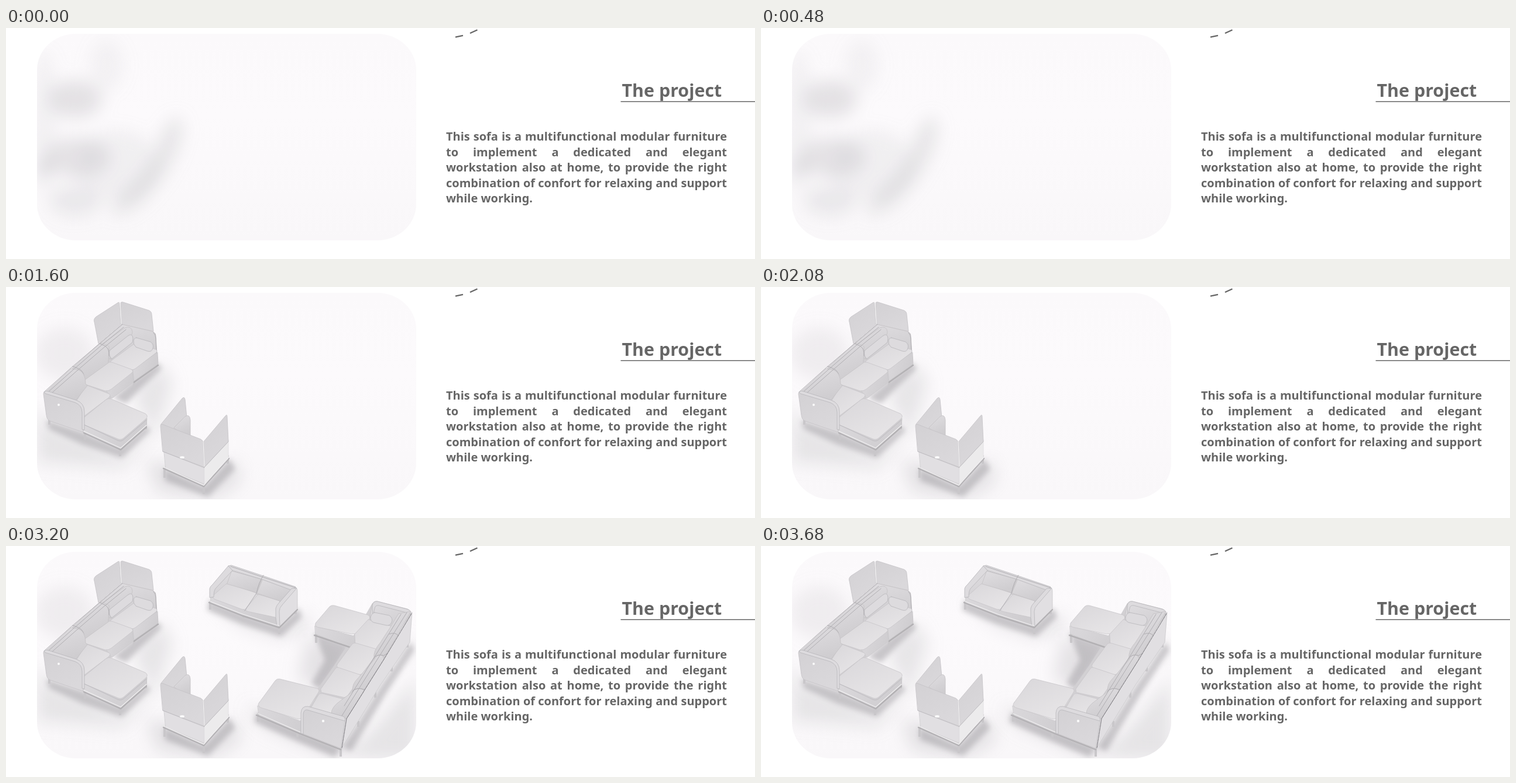
An HTML page that plays this animation: 1280x396 px, repeating every 4 s.

```html
<!DOCTYPE html>
<html lang="en">
<head>
<meta charset="utf-8">
<title>The project</title>
<style>
html, body { margin: 0; width: 100%; height: 100%; overflow: hidden; background: #fff; }
svg { position: absolute; left: 0; top: 0; }
text, .copy { font-family: "Noto Sans", "Open Sans", sans-serif; font-weight: 700; color: #666; fill: #666; }
.copy { position: absolute; left: 752px; top: 173px; width: 480px; font-size: 20px; line-height: 26.6px; }
.copy div { white-space: nowrap; text-align-last: justify; }
.copy div:last-child { text-align-last: left; }
.step path { stroke-linejoin: round; stroke-linecap: round; stroke-width: .8; }
.step .body { fill: #d2d0d3; }
.step .seat { fill: url(#seat); stroke: #c8c6c9; }
.step .front { fill: url(#front); stroke: #cbc9cc; }
.step .back { fill: url(#back); stroke: #c4c2c5; }
.step .wall { fill: url(#wall); stroke: #c4c2c6; }
.step .pale { fill: #ecebec; stroke: #e0dee1; }
.step .side { fill: #e1dfe2; stroke: #cbc9cc; }
.step .roll { fill: #dddbde; stroke: #b8b6ba; }
.step .seam { fill: none; stroke: #b0aeb2; stroke-width: 1; }
.step .hem { fill: none; stroke: #77757a; stroke-width: 1; stroke-dasharray: 5 1; }
.step .base { fill: none; stroke: #b3b1b4; stroke-width: 2.4; }
.step .leg { fill: none; stroke: #c9c7ca; stroke-width: 4; stroke-linecap: butt; }
.step .shine { fill: none; stroke: #f0eff0; stroke-width: 1.2; }
.step circle { fill: #fafafa; }
.soft { filter: url(#blur); fill: #c3c1c5; }
.near { filter: url(#haze); fill: #a8a6aa; opacity: .6; }
</style>
</head>
<body>
<svg width="1280" height="396" viewBox="0 0 1280 396">
  <defs>
    <filter id="blur" x="-80%" y="-80%" width="260%" height="260%"><feGaussianBlur stdDeviation="14"/></filter>
    <filter id="haze" x="-50%" y="-50%" width="200%" height="200%"><feGaussianBlur stdDeviation="5"/></filter>
    <clipPath id="card"><rect x="53" y="10" width="648" height="354" rx="66" ry="62"/></clipPath>
    <linearGradient id="paper" x2="0" y2="1"><stop stop-color="#fbf9fb"/><stop offset=".4" stop-color="#fcfafc"/><stop offset="1" stop-color="#f9f7f9"/></linearGradient>
    <linearGradient id="seat" x2=".7" y2="1"><stop stop-color="#d9d7da"/><stop offset="1" stop-color="#e7e5e7"/></linearGradient>
    <linearGradient id="front" x2="1" y2=".3"><stop stop-color="#dbd9dc"/><stop offset="1" stop-color="#cfcdd0"/></linearGradient>
    <linearGradient id="back" x2=".4" y2="1"><stop stop-color="#e0dee1"/><stop offset="1" stop-color="#cfcdd0"/></linearGradient>
    <linearGradient id="wall" x2=".5" y2="1"><stop stop-color="#d3d1d4"/><stop offset="1" stop-color="#dad8db"/></linearGradient>
  </defs>

  <g clip-path="url(#card)">
    <path fill="url(#paper)" d="M53 10H701V364H53Z"/>

    <g class="step soft" data-from="0" data-to="0">
      <ellipse cx="118" cy="122" rx="46" ry="32" opacity=".42"/>
      <ellipse cx="65" cy="160" rx="22" ry="120" opacity=".16"/>
      <ellipse cx="122" cy="222" rx="56" ry="34" opacity=".38"/>
      <ellipse cx="66" cy="240" rx="12" ry="16" opacity=".4"/>
      <ellipse cx="118" cy="296" rx="44" ry="26" opacity=".28"/>
      <ellipse cx="172" cy="64" rx="28" ry="44" opacity=".15"/>
      <path d="M292 150C315 165 292 225 262 264S205 325 178 316Q190 290 220 262T270 172Z" opacity=".36"/>
      <ellipse cx="190" cy="235" rx="70" ry="60" opacity=".18"/>
    </g>

    <g class="step" data-from="1">
      <g class="soft">
        <ellipse cx="100" cy="115" rx="50" ry="45" opacity=".22"/>
        <path d="M53 200 75 235 195 290 245 240 215 180 265 130 285 165 262 235 200 310 53 300Z" opacity=".36"/>
      </g>
      <path class="near" d="M68 228 132 248 196 276 240 238 247 246 198 293 130 270 74 244ZM182 190 218 160 260 130 266 140 226 178 205 200Z"/>
      <path class="leg" d="M74 227V236M135 250V262M195 278V290M239 229V244M219 162V175M258 120V136"/>
      <path class="body" d="M66 182 160 97 200 66 256 80 258 130 218 160 181 190 132 232Z"/>
      <path class="wall" d="M158 97 151 60Q149 55 154 51L191 27Q194 25 194 29L196 64Z"/>
      <path class="wall" d="M196 28Q196 25 200 26L244 40Q249 42 249 47L252 76 197 64Z"/>
      <path class="shine" d="M195 27 197 63"/>
      <path class="back" d="M160 97 198 64 250 76Q256 78 256 85L258 115 220 104 182 126Z"/>
      <path class="seam" d="M252 78Q256 82 256 88L258 132"/>
      <path class="front" d="M217 142 259 112 260 132 219 161Z"/>
      <path class="seat" d="M179 127 217 99Q222 96 227 98L256 107Q260 110 256 113L221 140Q217 143 212 141L180 131Z"/>
      <path class="back" d="M163 99 203 70Q215 66 216 77L215 82 180 111 178 124 162 110Z"/>
      <path class="roll" d="M177 109 208 84Q216 78 217 88L216 95 181 123Q175 119 177 109Z"/>
      <path class="roll" d="M223 87 247 94Q253 98 251 105 249 112 242 110L222 103Q217 98 218 92 219 87 223 87Z"/>
      <path class="front" d="M172 178 216 146 218 163 181 191Z"/>
      <path class="seat" d="M132 160 171 131Q176 128 181 129L214 141Q219 144 214 148L180 175Q175 179 169 178L133 166Z"/>
      <path class="back" d="M114 138 157 99Q163 95 168 98L176 102 175 130 135 159 122 149Z"/>
      <path class="seam" d="M114 136 124 140Q134 145 134 157M160 97 169 101Q177 105 176 118"/>
      <path class="seat" d="M120 196 137 168 176 183Q180 186 175 190L134 221Z"/>
      <path class="back" d="M66 181 111 140 124 142Q136 147 136 166L139 169 118 196Z"/>
      <path class="seam" d="M65 180 113 137 160 97 199 64M72 180 117 140 163 100 201 69M79 181 122 143 167 104 205 73"/>
      <path class="front" d="M130 231 196 262 241 225 240 239 196 277 132 246Z"/>
      <path class="seat" d="M133 224 171 193Q175 190 180 192L238 217Q244 221 239 226L201 259Q196 263 190 260L133 236Q127 230 133 224Z"/>
      <path class="seam" d="M131 235 191 263Q197 266 203 260L240 228" opacity=".6"/>
      <path class="base" d="M133 250 196 279 240 240M219 163 260 134"/>
      <path class="shine" d="M133 247 196 276 240 237"/>
      <path class="wall" d="M64 183Q64 179 69 180L115 195Q131 200 131 214L132 249 76 230Q70 228 69 220Z"/>
      <path class="roll" d="M65 180Q68 177 73 179L120 194Q134 199 134 214V245L130 244V215Q130 203 118 198L68 183Z"/>
      <circle cx="90" cy="202" r="2"/>
    </g>

    <g class="step" data-from="2">
      <path class="soft" opacity=".42" d="M240 300 270 300 340 345 395 295 400 335 350 364 260 350Z"/>
      <path class="near" d="M270 311 338 342 382 294 392 312 345 360 272 332Z"/>
      <path class="leg" d="M271 310V327M338 340V355M379 289V303"/>
      <path class="wall" d="M265 235 301 191Q305 187 306 193L309 224 302 254 268 248Z"/>
      <path class="back" d="M287 241 306 222Q314 217 315 228L315 256 303 254Z"/>
      <path class="base" d="M269 311 338 342 381 294"/>
      <path class="side" d="M270 280 339 307 339 338 273 311Z"/>
      <path class="pale" d="M339 307 380 262 380 294 339 338Z"/>
      <path class="wall" d="M264 238Q264 234 269 236L333 261Q337 263 337 268L339 310 268 282Z"/>
      <path class="wall" d="M337 266 375 221Q378 217 378 223L380 265 339 309Z"/>
      <path class="shine" d="M337 265 339 308"/>
      <path class="seam" d="M268 282 339 309 380 265" opacity=".45"/>
      <path class="shine" d="M270 309 338 340 381 291"/>
      <ellipse cx="301" cy="292" rx="4" ry="2" fill="#fafafa"/>
    </g>

    <g class="step soft" data-from="3" data-to="3">
      <path d="M470 125 530 110 535 160 480 155Z" opacity=".45"/>
      <ellipse cx="322" cy="73" rx="28" ry="22" opacity=".15"/>
    </g>

    <g class="step" data-from="3">
      <g class="soft">
        <path d="M600 180 690 160 705 220 640 300 580 364H701V180Z" opacity=".36"/>
        <path d="M410 275 440 310 510 340 570 364 600 330 430 280Z" opacity=".4"/>
        <path d="M515 155 590 180 560 215 530 245 500 225Z" opacity=".4"/>
      </g>
      <path class="near" d="M526 148 590 170 568 204 538 248 522 235 545 195ZM428 285 503 318 572 346 562 362 500 336 424 302ZM692 165 640 240 575 345 590 352 650 252 698 178Z"/>
      <path class="leg" d="M530 151V166M588 172V185M431 286V301M498 316V328M572 344V361M602 300V310M631 248V260M659 206V215M686 164V174"/>
      <path class="body" d="M596 150 626 98 690 112 580 298 506 282 560 206Z"/>
      <path class="side" d="M694 114 690 165 640 238 572 349 580 295Z"/>
      <path class="front" d="M528 137 594 154 620 140 598 172 588 174 529 151Z"/>
      <path class="seat" d="M530 131 553 104Q556 101 561 102L618 118Q623 120 621 125L601 147Q597 152 591 151L532 139Q526 136 530 131Z"/>
      <path class="base" d="M527 153 589 174"/>
      <path class="back" d="M622 120 626 100Q628 94 635 95L686 108Q694 111 690 119L666 155 630 140Z"/>
      <path class="roll" d="M626 102Q627 94 635 95L685 108Q694 111 692 117L684 114 637 102Q631 101 630 107L627 120Z"/>
      <path class="seat" d="M596 151 619 126 660 138 641 175Q637 180 631 178L597 167Z"/>
      <path class="roll" d="M630 114 655 119Q662 124 659 131 656 137 650 136L628 131Q622 128 623 122 625 115 630 114Z"/>
      <path class="seat" d="M566 203 591 169Q594 165 600 167L634 177Q638 179 635 183L611 216Q607 222 601 220L569 210Q564 207 566 203Z"/>
      <path class="seat" d="M538 245 563 210Q565 207 570 209L603 220Q609 222 605 226L585 255Q581 261 575 259L539 251Z"/>
      <path class="seat" d="M509 283 534 255Q536 252 541 253L575 262 566 292Z"/>
      <path class="back" d="M671 116 692 112 662 165 643 197 629 193Q627 180 640 165L655 142Z"/>
      <path class="back" d="M629 195Q633 186 643 186L646 194 608 253 593 248Q590 238 602 226Z"/>
      <path class="back" d="M592 250Q598 242 610 246L612 249 582 296 556 287Q556 276 572 265Z"/>
      <path class="seam" d="M675 117 578 274M685 114 574 291M627 194Q633 184 645 188L652 184M592 249Q600 241 612 246M655 151Q664 147 670 153"/>
      <path class="hem" d="M693 116 646 194 582 296 574 346"/>
      <path class="front" d="M430 274 503 300 534 255 506 304 503 322 432 288Z"/>
      <path class="seat" d="M433 268 460 231Q463 227 468 228L531 244Q537 246 534 251L508 292Q504 298 497 296L435 277Q428 273 433 268Z"/>
      <path class="base" d="M428 290 503 322 572 349"/>
      <path class="shine" d="M430 287 503 319"/>
      <path class="wall" d="M506 284Q507 275 515 277L575 294Q580 296 579 301L572 347 505 321Z"/>
      <path class="roll" d="M504 321V286Q505 274 516 275L576 292Q581 294 579 300L515 281Q509 280 508 288V322Z"/>
      <circle cx="542" cy="300" r="2.2"/>
    </g>

    <g class="step" data-from="4">
      <path class="soft" opacity=".4" d="M340 90 405 125 465 145 515 115 520 140 470 160 400 138Z"/>
      <path class="near" d="M348 92 405 116 467 137 500 106 506 122 470 156 402 134 344 110Z"/>
      <path class="leg" d="M349 95V109M405 118V129M467 137V151M495 104V117"/>
      <path class="front" d="M350 85 407 109 466 122 467 138 405 118 350 99Z"/>
      <path class="back" d="M350 70 380 35 437 53 495 72 466 104 430 84 378 64 352 88Z"/>
      <path class="seat" d="M355 84 375 66Q378 63 383 65L426 80Q430 82 427 86L411 106Q408 110 402 108L356 91Q351 88 355 84Z"/>
      <path class="seat" d="M411 106 428 86Q430 82 435 84L468 94 464 123 412 112Q408 110 411 106Z"/>
      <path class="back" d="M386 43 437 57 428 80 378 65Z"/>
      <path class="back" d="M439 57 489 74 470 95 429 81Z"/>
      <path class="roll" d="M380 34 385 33 439 51 495 70 489 76 437 57 387 42Z"/>
      <path class="seam" d="M440 50Q432 62 428 81L408 111M384 35 438 53 496 72"/>
      <path class="roll" d="M348 88V73Q349 69 353 66L380 34 387 42 358 73Q355 77 355 87Z"/>
      <path class="side" d="M466 106 494 73Q498 70 498 78V108L468 138Z"/>
      <path class="roll" d="M461 122V107Q462 102 466 98L488 73 497 72 472 101Q467 106 467 112L468 138 463 136Z"/>
      <path class="base" d="M347 97 405 120 467 140 498 109"/>
      <path class="shine" d="M349 95 405 117 467 137"/>
    </g>
  </g>

  <path d="M768 15.6 781 12.8M793 9 805.5 3.2" fill="none" stroke="#666" stroke-width="2.3"/>
  <text x="1052.5" y="118" font-size="30.4">The project</text>
  <path d="M1050.5 126.3H1280" stroke="#666" stroke-width="1.4"/>
</svg>

<div class="copy">
  <div>This sofa is a multifunctional modular furniture</div>
  <div>to implement a dedicated and elegant</div>
  <div>workstation also at home, to provide the right</div>
  <div>combination of confort for relaxing and support</div>
  <div>while working.</div>
</div>

<script>
const LOOP = 4000, STEPS = 5;

// Each group is shown from its first step to the end of its last one.
document.querySelectorAll(".step").forEach(group => {
  const { from, to = STEPS - 1 } = group.dataset;
  const on = from / STEPS, off = (Number(to) + 1) / STEPS;
  const anim = group.animate([
    { opacity: 0, offset: 0 },
    { opacity: 0, offset: on },
    { opacity: 1, offset: on },
    { opacity: 1, offset: off },
    { opacity: 0, offset: off },
    { opacity: 0, offset: 1 }
  ], { duration: LOOP, iterations: Infinity });
  anim.startTime = 0;
});
</script>
</body>
</html>
```
